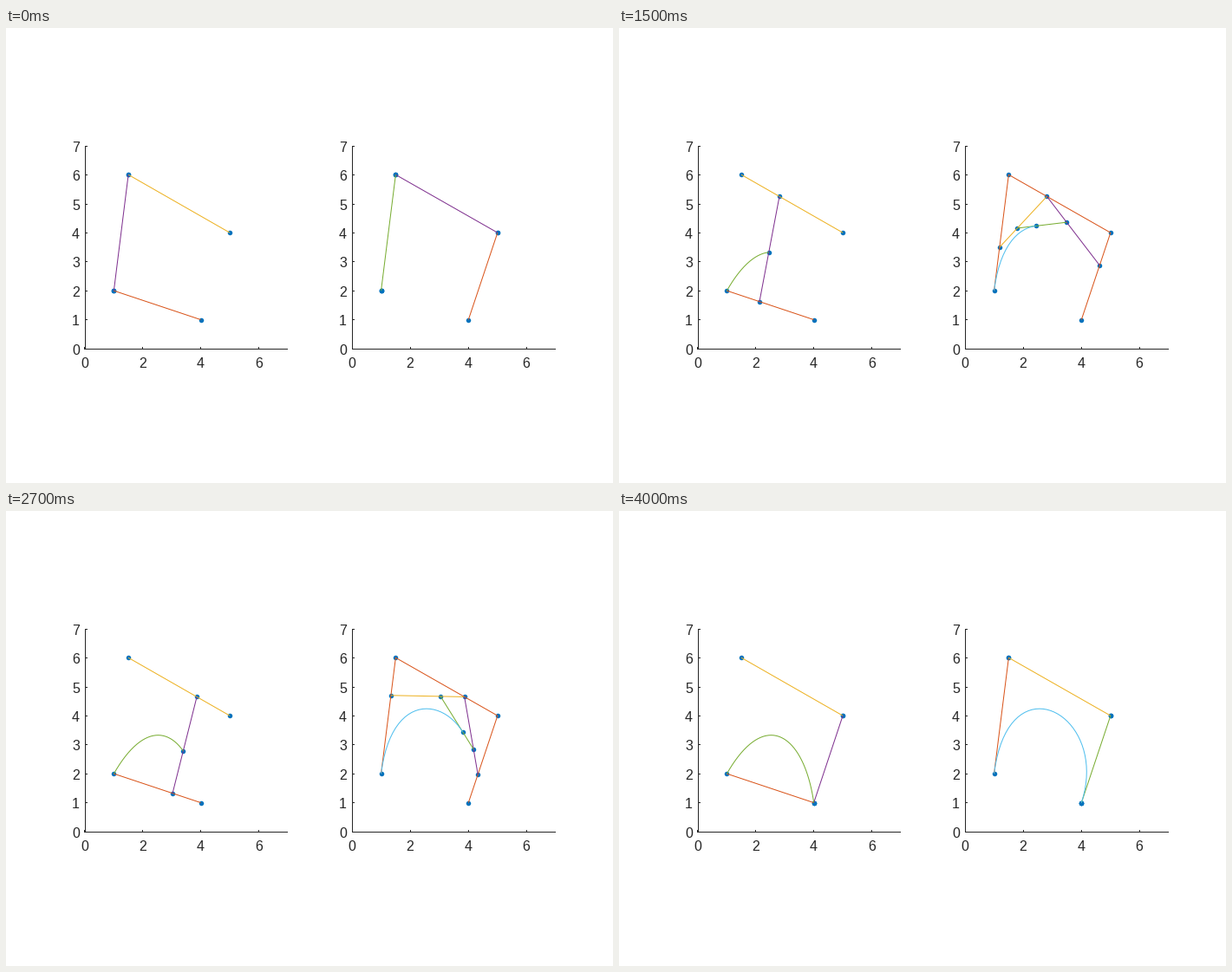
A matplotlib script that plays this animation: 700x525 px, repeating every 4.1 s.

```python
import numpy as np
import matplotlib.pyplot as plt
from matplotlib.animation import FuncAnimation

W, H, DPI = 700, 525, 100
FRAMES, INTERVAL = 41, 100
PX = 72 / DPI                      # one pixel in points
HEIGHT = 234.26                    # panel height in pixels
UNIT_Y = HEIGHT / 7
BASE = 370.05                      # pixel row of y = 0

BLUE, ORANGE, YELLOW = "#0072BD", "#D95319", "#EDB120"
PURPLE, GREEN, CYAN = "#7E2F8E", "#77AC30", "#4DBEEE"
INK = "#262626"

A, B, C, D = (np.array(p, float) for p in [(1, 2), (4, 1), (1.5, 6), (5, 4)])

plt.rcParams["font.family"] = "Liberation Sans"
fig = plt.figure(figsize=(W / DPI, H / DPI), dpi=DPI, facecolor="white")
ax = fig.add_axes([0, 0, 1, 1])
ax.set_xlim(0, W)
ax.set_ylim(H, 0)
ax.axis("off")


def lerp(p, q, t):
    return p + (q - p) * t


def stroke(x0, y0, x1, y1):
    ax.plot([x0, x1], [y0, y1], color=INK, lw=PX, solid_capstyle="butt",
            snap=False)


def label(x, y, n):
    ax.text(x, y, str(n), color=INK, fontsize=16 * PX, ha="center",
            va="baseline")


def draw_axes(x0, width):
    col, row = round(x0), int(BASE)
    unit = width / 7
    stroke(col, row + 0.5, col + width, row + 0.5)
    stroke(col + 0.5, row + 1, col + 0.5, int(BASE - HEIGHT) + 1)
    for n in range(0, 7, 2):
        x = int(x0 + n * unit) + 0.5
        stroke(x, row + 1, x, row - 2)
        label(x0 + n * unit - 0.3, 392, n)
    for n in range(8):
        y = int(BASE - n * UNIT_Y + 0.3) + 0.5
        stroke(col, y, col + 3, y)
        label(x0 - 10.4, y + 6.5, n)


def uncovered(path, later):
    """Break the path wherever a later path repeats the same segment."""
    taken = [(p, q) for other in later for p, q in zip(other, other[1:])]
    points = [path[0]]
    for p, q in zip(path, path[1:]):
        if any(np.allclose(p, a) and np.allclose(q, b) for a, b in taken):
            points.append((np.nan, np.nan))
        points.append(q)
    return np.array(points)


class Panel:
    """Dots below a stack of coloured lines."""

    def __init__(self, x0, width, colors):
        draw_axes(x0, width)
        self.x0, self.unit = x0, width / 7
        self.dots, = ax.plot([], [], "o", color=BLUE, ms=5.5 * PX, mew=0)
        self.lines = [ax.plot([], [], color=c, lw=PX, solid_capstyle="butt")[0]
                      for c in colors]

    def pixels(self, points):
        p = np.asarray(points)
        return self.x0 + self.unit * p[:, 0], BASE - UNIT_Y * p[:, 1]

    def show(self, dots, paths, trace):
        self.dots.set_data(*np.round(self.pixels(dots)))
        for i, path in enumerate(paths):
            visible = uncovered(path, paths[i + 1:])
            self.lines[i].set_data(*self.pixels(visible))
        self.lines[-1].set_data(*self.pixels(trace))

    def artists(self):
        return [self.dots, *self.lines]


def ruled(t):
    """Slider between two segments: both ends and the point on it."""
    p, q = lerp(A, B, t), lerp(C, D, t)
    return p, q, lerp(p, q, 2 * t * (1 - t))


def casteljau(t):
    """All intermediate points of the cubic through A, C, D, B."""
    q = [lerp(A, C, t), lerp(C, D, t), lerp(D, B, t)]
    r = [lerp(q[0], q[1], t), lerp(q[1], q[2], t)]
    return q, r, lerp(r[0], r[1], t)


left = Panel(90.95, 234, [ORANGE, YELLOW, PURPLE, GREEN])
right = Panel(399, 235, [ORANGE, YELLOW, PURPLE, GREEN, CYAN])


def update(k):
    t = k / (FRAMES - 1)
    past = np.arange(k + 1) / (FRAMES - 1)

    p, q, r = ruled(t)
    left.show([A, B, C, D, p, q, r], [[A, B], [C, D], [p, q]],
              [ruled(u)[2] for u in past])

    q, r, s = casteljau(t)
    right.show([A, C, D, B, *q, *r, s], [[A, C, D, B], q[:2], q[1:], r],
               [casteljau(u)[2] for u in past])
    return left.artists() + right.artists()


anim = FuncAnimation(fig, update, frames=FRAMES, interval=INTERVAL,
                     repeat=True, repeat_delay=0, blit=False)
plt.show()
```
